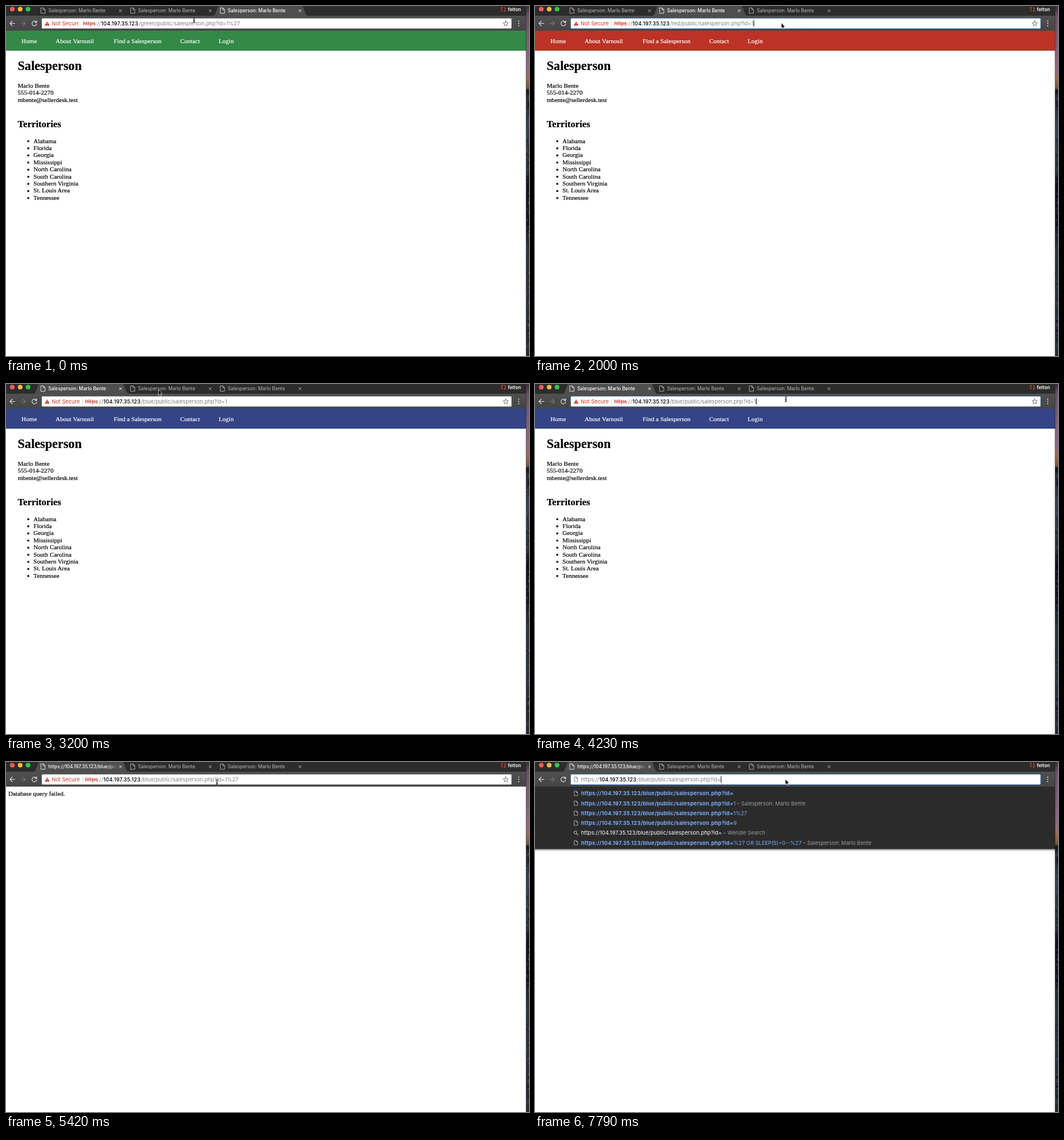
These frames come from a looping animation (915x612 px, 8000 ms). An HTML page:

```html
<!DOCTYPE html>
<html lang="en">
<head>
<meta charset="utf-8">
<title>Browser tabs</title>
<style>
html, body { margin: 0; width: 100%; height: 100%; overflow: hidden; background: #fff; }
svg { display: block; width: 915px; height: 612px; }
text { white-space: pre; }
.ui { font-family: Inter, "Liberation Sans", sans-serif; }
.page { font: 11.07px "Liberation Serif", serif; fill: #000; stroke: #000; stroke-width: .2; }
.nav { fill: #fff; stroke: #fff; }
.h1 { font-size: 22.15px; font-weight: 700; }
.h2 { font-size: 16.6px; font-weight: 700; }
.tab { font-size: 8.25px; fill: #b9b9b9; }
.on { fill: #fff; font-weight: 500; }
.url { font-size: 9.27px; fill: #808080; }
.host { fill: #000; font-weight: 500; letter-spacing: .2px; }
.warn { fill: #c8372b; }
.struck { fill: #c8372b; text-decoration: line-through; }
.row { font-size: 9.27px; fill: #9b9b9b; }
.link { fill: #7baaf7; }
.hit { fill: #7baaf7; font-weight: 700; font-size: 9.35px; letter-spacing: .21px; }
.query { fill: #fff; letter-spacing: .13px; }
.line { fill: none; stroke-linecap: round; stroke-linejoin: round; }
</style>
</head>
<body>
<svg viewBox="0 0 915 612" xmlns="http://www.w3.org/2000/svg">
  <defs>
    <linearGradient id="bar" x2="0" y2="1">
      <stop offset="0" stop-color="#505050"/><stop offset="1" stop-color="#454545"/>
    </linearGradient>
    <linearGradient id="strip" x2="0" y2="1">
      <stop offset="0" stop-color="#3a3038"/><stop offset=".03" stop-color="#6c5265"/>
      <stop offset=".18" stop-color="#8f6a84"/><stop offset=".205" stop-color="#9c6a50"/>
      <stop offset=".235" stop-color="#75553f"/><stop offset=".24" stop-color="#161a22"/>
      <stop offset=".34" stop-color="#3a404c"/><stop offset=".46" stop-color="#2c323d"/>
      <stop offset=".52" stop-color="#0d1016"/><stop offset=".62" stop-color="#141820"/>
      <stop offset=".7" stop-color="#2d333e"/><stop offset="1" stop-color="#262b35"/>
    </linearGradient>
    <linearGradient id="fade">
      <stop offset="0" stop-color="#4e4e4e" stop-opacity="0"/><stop offset="1" stop-color="#4e4e4e"/>
    </linearGradient>
    <linearGradient id="shade" x2="0" y2="1">
      <stop offset="0" stop-color="#000" stop-opacity=".5"/><stop offset="1" stop-color="#000" stop-opacity="0"/>
    </linearGradient>
    <clipPath id="title"><rect x="70" y="0" width="124" height="17"/></clipPath>
    <clipPath id="badge"><rect id="badgeBox" x="60" y="22" height="17"/></clipPath>
  </defs>
  <rect width="915" height="612" fill="#fff"/>
  <g id="content"></g>
  <rect width="910" height="17" fill="#2c2c2c"/>
  <rect y="17" width="910" height="26" fill="url(#bar)"/>
  <g id="fixed"></g>
  <g id="tabs" class="ui"></g>
  <g id="omni" class="ui"></g>
  <rect id="caret" y="25" width="1" height="11" fill="#000"/>
  <g id="menu" class="ui"></g>
  <rect x="910" width="5" height="612" fill="url(#strip)"/>
  <g id="rocks"></g>
  <rect x="909.4" width=".9" height="612" fill="#222" opacity=".6"/>
  <g id="cursor">
    <path id="arrow" d="M0 0V9.6L2.2 7.6L3.7 11L5.3 10.3L3.8 7H6.8Z" fill="#000" stroke="#fff" stroke-width=".7"/>
    <g id="beam"></g>
  </g>
</svg>
<script>
const $ = id => document.getElementById(id);
const LOOP = 8000;
const PERSON = 'Marlo Bente';
const TITLE = 'Salesperson: ' + PERSON;
const HOST = '104.197.35.123';
const SITES = {
  green: { tab: 2, fill: '#328a46', edge: '#256d35' },
  red: { tab: 1, fill: '#bc3325', edge: '#93261b' },
  blue: { tab: 0, fill: '#344487', edge: '#27346b' }
};
const STATES = ['Alabama', 'Florida', 'Georgia', 'Mississippi', 'North Carolina',
  'South Carolina', 'Southern Virginia', 'St. Louis Area', 'Tennessee'];

// [first, last, count]: moments at which the screen refreshes
const TICKS = [[0, 0, 1], [150, 360, 2], [660, 1550, 7], [2000, 2900, 7], [3200, 4230, 8],
  [4680, 5710, 8], [5860, 5860, 1], [6160, 6160, 1], [6760, 7490, 6], [7790, 7790, 1]]
  .flatMap(([a, b, n]) => Array.from({ length: n }, (_, i) => n > 1 ? a + (b - a) * i / (n - 1) : a));

// what changes in the browser, each entry adding to the one before
const EVENTS = [
  [0, { site: 'green', id: '1%27', shift: -4, focus: 0, caret: 0, edit: 0, rows: 0, failed: 0 }],
  [150, { shift: 0 }],
  [660, { site: 'red', id: '1' }],
  [1540, { focus: 1, caret: 1 }],
  [2140, { edit: 1, rows: 2, id: '1%' }],
  [2290, { id: '1%2' }],
  [2440, { id: '1%27' }],
  [2590, { edit: 0, rows: 0, focus: 0, caret: 0, shift: -25 }],
  [2740, { shift: -4 }],
  [2890, { shift: 0 }],
  [3200, { site: 'blue', id: '1' }],
  [4230, { focus: 1, caret: 1 }],
  [4680, { edit: 1, rows: 2, id: '1%' }],
  [4820, { id: '1%2' }],
  [4970, { id: '1%27' }],
  [5115, { edit: 0, rows: 0, focus: 0, caret: 0, failed: 1, shift: -25 }],
  [5260, { shift: -4 }],
  [5410, { shift: 0 }],
  [6160, { focus: 1, caret: 1 }],
  [6760, { caret: 0 }],
  [7040, { caret: 1 }],
  [7190, { edit: 1, rows: 3, id: '1%2' }],
  [7340, { id: '1%' }],
  [7490, { id: '1' }],
  [7790, { id: '', rows: 6 }]
];

// time, x, y of the pointer
const PATH = [[0, 329, 24], [150, 314, 14], [360, 300, 8], [660, 296, 8], [810, 302, 11],
  [1400, 431, 30], [2000, 431, 29.5], [2590, 431, 29.5], [2740, 290, 14], [2890, 150, 6],
  [3200, 266.5, 10], [4080, 439, 26], [5115, 439, 26], [5410, 369, 36], [5710, 432, 36],
  [5860, 438, 31], [6160, 438, 30]];

const text = (x, y, s, cls = '', more = '') => `<text x="${x}" y="${y}" class="${cls}" ${more}>${s}</text>`;
const span = (s, cls, x) => `<tspan class="${cls}"${x === undefined ? '' : ` x="${x}"`}>${s}</tspan>`;
const line = (d, color, w = 1.1) => `<path class="line" d="${d}" stroke="${color}" stroke-width="${w}"/>`;
const sheet = (x, y, color, k = 1) =>
  `<g transform="translate(${x} ${y}) scale(${k})">${line('M0 0H4L7 3V9.5H0ZM4 0V3H7', color, .9)}</g>`;
const route = (site, id) => `/${site}/public/salesperson.php?id=${id}`;

function drawFixed() {
  const lights = ['#fc5b57', '#fdbc40', '#34c84a']
    .map((c, i) => `<circle cx="${11 + 13.8 * i}" cy="5.5" r="4.1" fill="${c}"/>`).join('');
  const dots = [26.5, 30.5, 34.5].map(y => `<circle cx="897" cy="${y}" r="1.05" fill="#ddd"/>`).join('');
  $('fixed').innerHTML = lights + dots +
    line('M15.5 30.5H7M11 26.4L7 30.5L11 34.6', '#e2e2e2', 1.2) +
    line('M25.5 30.5H34M30 26.4L34 30.5L30 34.6', '#777', 1.2) +
    line('M53 28.2A4.1 4.1 0 1 0 53.6 31.6M53.6 26V28.8H50.8', '#e2e2e2', 1.2) +
    line('M868.5 9A3.6 3.6 0 0 1 868.8 2.8M868.8 2.8L867 2.2M871.8 2.6A3.6 3.6 0 0 1 871.6 9M871.6 9L873.4 9.6', '#e0483a', 1.2) +
    text(878, 9.2, 'felton', 'ui', 'font-size="8.2" font-weight="600" fill="#fff"');

  const bar = 'M-1.8 -5.2Q0 -5.2 0 -4V4Q0 5.2 -1.8 5.2M1.8 -5.2Q0 -5.2 0 -4V4Q0 5.2 1.8 5.2M-1 1.6H1';
  $('beam').innerHTML = line(bar, 'rgba(255,255,255,.35)', 1.7) + line(bar, '#000', .8);

  let seed = 7;
  const random = () => (seed = seed * 16807 % 2147483647) / 2147483647;
  $('rocks').innerHTML = Array.from({ length: 110 }, () => {
    const x = 910 + 4 * random(), y = 148 + 460 * random(), h = 1 + 4 * random();
    const color = random() < .5 ? '#050709' : '#5a6270';
    return `<rect x="${x.toFixed(1)}" y="${y.toFixed(1)}" width="1.5" height="${h.toFixed(1)}" fill="${color}" opacity=".5"/>`;
  }).join('');
}

function drawTabs(s) {
  const active = SITES[s.site].tab;
  const one = i => {
    const on = i === active, ink = on ? '#f2f2f2' : '#b9b9b9';
    const name = i === 0 && s.failed ? `https://${HOST}/blue/public` : TITLE;
    return `<g transform="translate(${157 * i} 0)">` +
      (on ? '<path d="M49 17.2Q50.5 17 51.3 15L57 1Q57.4 0 58.2 0H204.3Q205 0 205.5 1L211.2 15Q212 17 213.5 17.2Z" fill="#4e4e4e"/>' : '') +
      sheet(61.3, 3.3, ink) +
      `<g clip-path="url(#title)">${text(74, 11, name, on ? 'tab on' : 'tab')}</g>` +
      (on ? '<rect x="179" y="1" width="15.5" height="15" fill="url(#fade)"/>' : '') +
      line('M198.2 6.2L202.4 10.4M202.4 6.2L198.2 10.4', ink, 1) + '</g>';
  };
  $('tabs').innerHTML = [0, 1, 2].map(one).join('');
}

function drawOmni(s) {
  const x = s.edit ? 80.7 : 138.6 + s.shift, rule = 134 + s.shift * 1.3;
  const star = Array.from({ length: 10 }, (_, i) => {
    const r = i % 2 ? 2.1 : 4.9, a = Math.PI * (i / 5 - .5);
    return (874.3 + r * Math.cos(a)).toFixed(2) + ' ' + (30.8 + r * Math.sin(a)).toFixed(2);
  }).join('L');
  $('badgeBox').setAttribute('width', rule - 62);
  $('omni').innerHTML =
    `<rect x="62.5" y="21.5" width="822" height="18" rx="1.8" fill="#fff" stroke="${s.focus ? '#5b93d8' : '#8c8c8c'}"/>` +
    (s.edit ? sheet(69, 26.3, '#666', .82) :
      '<path d="M72 26.7L76.3 34.3H67.7Z" fill="#c8372b"/><path d="M72 29.2V31.6M72 32.5V33.3" stroke="#fff" stroke-width=".9"/>' +
      `<g class="url" clip-path="url(#badge)">${text(80, 34, 'Not Secure', 'warn')}</g>` +
      `<rect x="${rule}" y="25.5" width=".7" height="10" fill="#ccc"/>` +
      line(`M${star}Z`, '#666', .9)) +
    `<text y="34" class="url">` + span('https', s.edit ? '' : 'struck', x) + span('://', '') +
    span(HOST, 'host', x + 31.7) +
    `<tspan id="route" x="${x + 97.6}">${route(s.site, s.id)}</tspan></text>`;
  $('caret').setAttribute('x', x + 97.6 + $('route').getComputedTextLength());
  $('caret').style.display = s.caret ? '' : 'none';
}

function drawContent(s) {
  if (s.failed) {
    $('content').innerHTML = text(4, 59, 'Database query failed.', 'page');
    return;
  }
  const { fill, edge } = SITES[s.site];
  const links = [[27, 'Home'], [86.7, 'About Varnosil'], [188.5, 'Find a Salesperson'], [304.8, 'Contact'], [372, 'Login']];
  const lines = [PERSON, '555-014-2270', 'mbente@sellerdesk.test'];
  $('content').innerHTML =
    `<rect y="43" width="910" height="35" fill="${fill}"/><rect y="77" width="910" height="1" fill="${edge}"/>` +
    links.map(([x, t]) => text(x, 65, t, 'page nav')).join('') +
    text(20.5, 112.3, 'Salesperson', 'page h1') +
    lines.map((t, i) => text(20.5, 142.6 + 12.45 * i, t, 'page')).join('') +
    text(20.5, 211.8, 'Territories', 'page h2') +
    STATES.map((t, i) => {
      const y = 239.5 + 12.42 * i;
      return `<circle cx="39" cy="${y - 3}" r="1.8"/>` + text(48, y, t, 'page');
    }).join('');
}

function drawMenu(s) {
  if (!s.rows) { $('menu').innerHTML = ''; return; }
  const typed = `https://${HOST}` + route(s.site, s.id);
  const hit = (rest = '', note = '') =>
    span(typed, 'hit') + span(rest, 'link') + (note && span(' – ' + note, ''));
  const search = span(typed, 'query') + span(' – Wendle Search', '');
  const rows = {
    2: [hit(), search],
    3: [hit(), hit('1%27'.slice(s.id.length)), search],
    6: [hit(), hit('1', TITLE), hit('1%27'), hit('9'), search, hit('%27 OR SLEEP(5)=0--%27', TITLE)]
  }[s.rows];
  const h = 17.25 * s.rows + 5.5;
  $('menu').innerHTML =
    `<rect y="43" width="910" height="${h}" fill="#2b2b2b"/>` +
    `<rect y="${43 + h}" width="910" height="4" fill="url(#shade)"/>` +
    rows.map((r, i) => {
      const y = 55 + 17.25 * i;
      const icon = r === search
        ? `<circle cx="70.6" cy="${y - .8}" r="2.5" fill="none" stroke="#ccc"/>` + line(`M72.6 ${y + 1.2}L75 ${y + 3.6}`, '#ccc')
        : sheet(69, y - 4, '#ccc', .82);
      return icon + text(80.7, y + 3.4, r, 'row');
    }).join('');
}

function drawCursor(t) {
  let i = PATH.length - 1;
  while (PATH[i][0] > t) i--;
  const a = PATH[i], b = PATH[i + 1] || a;
  let k = b === a ? 0 : (t - a[0]) / (b[0] - a[0]);
  k = k * k * (3 - 2 * k);
  const x = a[1] + (b[1] - a[1]) * k, y = a[2] + (b[2] - a[2]) * k;
  const arrow = y < 21 || (t >= 2000 && t < 2700) || t >= 6160;
  $('cursor').setAttribute('transform', `translate(${x.toFixed(2)} ${y.toFixed(2)})`);
  $('arrow').style.display = arrow ? '' : 'none';
  $('beam').style.display = arrow ? 'none' : '';
}

let last = -1;
function update(now) {
  const time = now % LOOP;
  const t = TICKS.filter(v => v <= time).pop();
  if (t !== last) {
    last = t;
    const s = Object.assign({}, ...EVENTS.filter(e => e[0] <= t).map(e => e[1]));
    drawContent(s);
    drawTabs(s);
    drawOmni(s);
    drawMenu(s);
    drawCursor(t);
  }
}

drawFixed();
update(0);
const start = performance.now();
(function loop() {
  update(performance.now() - start);
  requestAnimationFrame(loop);
})();
</script>
</body>
</html>
```
